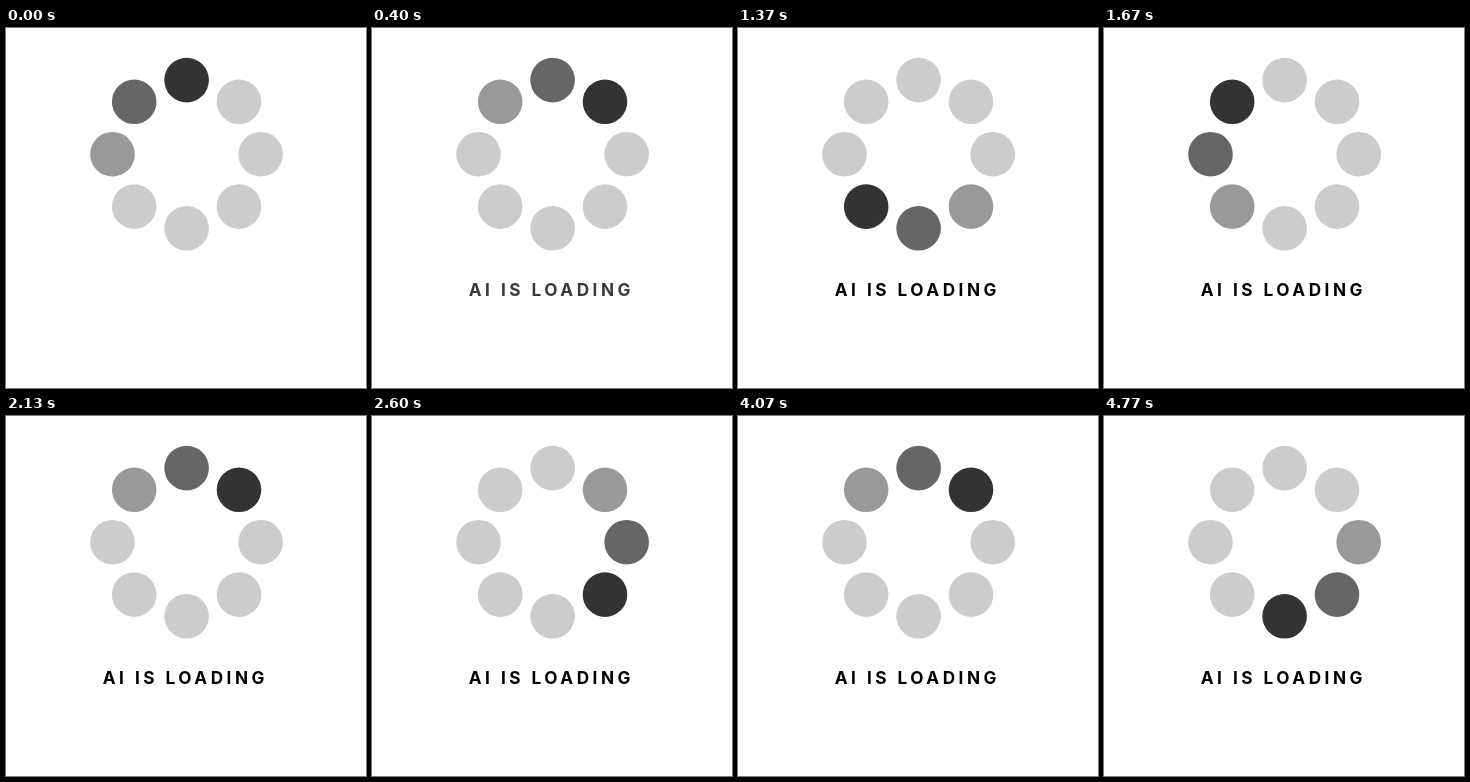
An HTML page for the animation above (5 s loop, 360 by 360 pixels).

```html
<!DOCTYPE html>
<html lang="en">
<head>
<meta charset="utf-8">
<title>Loading</title>
<style>
  html, body { margin: 0; width: 100%; height: 100%; overflow: hidden; background: #fff; }
  svg { display: block; width: 360px; height: 360px; }
  text { font: 700 17.2px Inter, "Open Sans", sans-serif; letter-spacing: 3.5px; fill: #000; }
</style>
</head>
<body>
<svg viewBox="0 0 360 360">
  <g id="ring"></g>
  <text id="label" x="96.7" y="268" opacity="0">AI IS LOADING</text>
</svg>
<script>
const LOOP = 5000;
const DOTS = 8;
const STEPS = 21;
const TRAIL = ['#333', '#666', '#999'];
const REST = '#ccc';
const FADE = { start: 100, length: 1370 };

const ring = document.getElementById('ring');
const label = document.getElementById('label');

const dots = Array.from({ length: DOTS }, (_, i) => {
  const angle = i * 2 * Math.PI / DOTS;
  const dot = document.createElementNS('http://www.w3.org/2000/svg', 'circle');
  dot.setAttribute('cx', 180.6 + 74.1 * Math.sin(angle));
  dot.setAttribute('cy', 126.2 - 74.1 * Math.cos(angle));
  dot.setAttribute('r', 22.3);
  return ring.appendChild(dot);
});

// Step times fall on a 30 fps grid, rounded to 10 ms.
const stepTimes = Array.from({ length: STEPS }, (_, k) =>
  Math.round(Math.floor(7.18 * k) * 10 / 3) * 10);

function draw(t) {
  const head = stepTimes.filter(start => start <= t).length - 1;
  dots.forEach((dot, i) => {
    const behind = (head - i + 3 * DOTS) % DOTS;
    dot.setAttribute('fill', TRAIL[behind] || REST);
  });
  const p = Math.min(1, Math.max(0, (t - FADE.start) / FADE.length));
  label.setAttribute('opacity', p < 1 ? 1 - Math.pow(1 - p, 6) : 1);
}

const begin = performance.now();
function tick() {
  draw((performance.now() - begin) % LOOP);
  requestAnimationFrame(tick);
}
tick();
</script>
</body>
</html>
```
